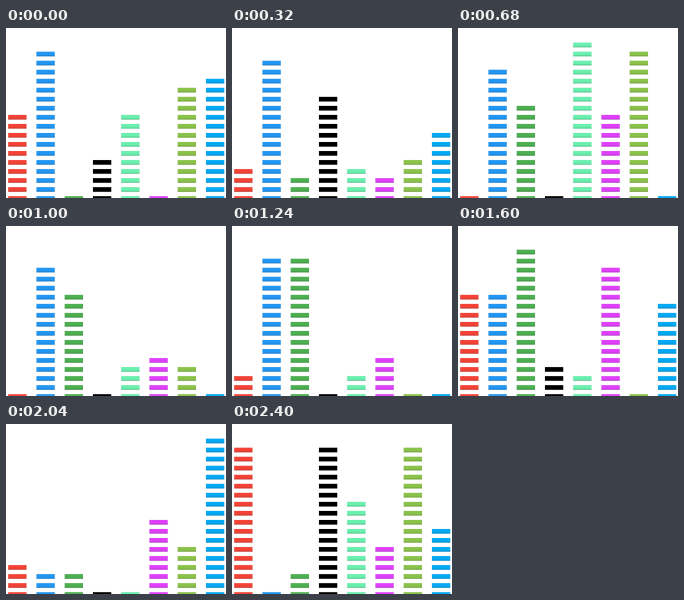
An HTML page with a canvas that plays this animation: 220x170 px, repeating every 2440 ms.

```html
<!DOCTYPE html>
<html lang="en">
<head>
<meta charset="utf-8">
<title>Equalizer</title>
<style>
  html, body { margin: 0; width: 100%; height: 100%; overflow: hidden; background: #fff; }
  canvas { display: block; width: 220px; height: 170px; }
</style>
</head>
<body>
<canvas id="stage" width="220" height="170"></canvas>
<script>
const ctx = document.getElementById('stage').getContext('2d');
const LOOP = 2440, STEP = 40;
const LEFT = 2.2, PITCH_X = 28.25, BAR_W = 18.3;
const BASE_Y = 168.2, PITCH_Y = 9.03, BAR_H = 4.6;

// Each column swells around a few hits; spread is the rise and fall time in ms.
const hit = (time, height) => ({ time, height });
const columns = [
  { color: '#f44336', spread: 520, hits: [hit(10, 10), hit(1600, 12), hit(2400, 17)] },
  { color: '#2196f3', spread: 1100, hits: [hit(60, 17), hit(1240, 16)] },
  { color: '#4caf50', spread: 700, hits: [hit(760, 11), hit(1480, 18), hit(2400, 3)] },
  { color: '#000000', spread: 440, hits: [hit(250, 12.5), hit(1600, 4), hit(2400, 17)] },
  { color: '#69f0ae', spread: 460, hits: [hit(0, 10), hit(680, 18), hit(1420, 4), hit(2400, 11)] },
  { color: '#e040fb', spread: 600, hits: [hit(700, 10), hit(1600, 15), hit(2220, 8)] },
  { color: '#8bc34a', spread: 460, hits: [hit(0, 13), hit(680, 17), hit(2320, 18)] },
  { color: '#03a9f4', spread: 800, hits: [hit(-60, 14.3), hit(1970, 18.8)] }
];

// Raised cosine: 1 at the centre, 0 at a distance of 1 and beyond.
const bump = d => (1 + Math.cos(Math.PI * Math.min(1, Math.abs(d)))) / 2;

function levelAt({ hits, spread }, time) {
  const sum = hits.reduce((total, h) => total + h.height * bump((time - h.time) / spread), 0);
  return Math.max(1, Math.round(sum));
}

function drawSegment(x, y, color) {
  ctx.fillStyle = 'rgba(0, 0, 0, 0.06)';
  ctx.fillRect(x - 0.4, y - 0.4, BAR_W + 0.8, BAR_H + 0.8);
  ctx.fillStyle = color;
  ctx.fillRect(x, y, BAR_W, BAR_H);
  ctx.fillStyle = 'rgba(0, 0, 0, 0.17)';
  ctx.fillRect(x, y + BAR_H - 1, BAR_W, 1);
}

function draw(now) {
  const time = Math.floor((now % LOOP) / STEP) * STEP;
  ctx.fillStyle = '#fff';
  ctx.fillRect(0, 0, 220, 170);
  columns.forEach((column, i) => {
    const level = levelAt(column, time);
    for (let k = 0; k < level; k++) {
      drawSegment(LEFT + i * PITCH_X, BASE_Y - k * PITCH_Y, column.color);
    }
  });
}

const start = performance.now();
function tick() {
  draw(performance.now() - start);
  requestAnimationFrame(tick);
}
tick();
</script>
</body>
</html>
```
